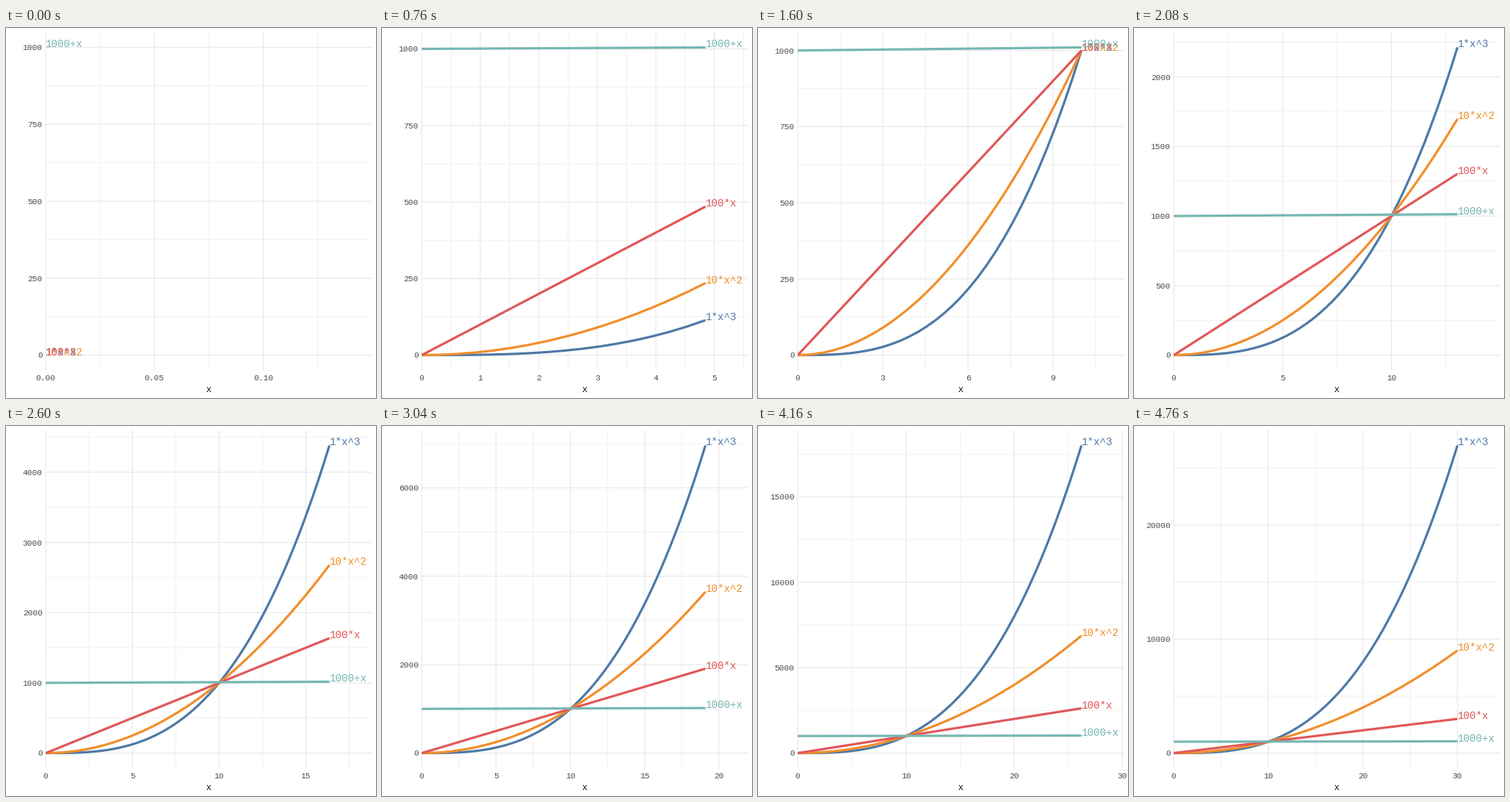
Animation of 504 by 504 pixels, one loop 4800 ms. Source, as a matplotlib script:

```python
import math

import matplotlib.pyplot as plt
import numpy as np
from matplotlib.animation import FuncAnimation
from matplotlib.collections import LineCollection
from matplotlib.patches import Rectangle

SIZE = 504
FRAMES, INTERVAL = 120, 40
LEFT, RIGHT, TOP, BOTTOM = 54.2, 498.5, 5.5, 466.5
FONT = "Liberation Mono"
TICK_SIZE, LABEL_SIZE = 11.2, 14.2

CURVES = [
    ("1*x^3", "#4E79A7", lambda x: x ** 3),
    ("10*x^2", "#F28E2B", lambda x: 10 * x ** 2),
    ("100*x", "#E15759", lambda x: 100 * x),
    ("1000+x", "#76B7B2", lambda x: 1000 + x),
]

# Samples appear on whole frames; the tip moves linearly between them.
XS = np.linspace(0, 30, 100)
KEYS = np.floor(np.arange(100) * (FRAMES - 1) / 99 + 0.5)


def nice_breaks(lo, hi, m=5):
    """Tick positions by the extended Wilkinson algorithm."""
    steps = [1, 5, 2, 2.5, 4, 3]
    eps = 1e-10
    span = hi - lo

    def total(simple, cover, dense):
        return 0.25 * simple + 0.2 * cover + 0.5 * dense + 0.05

    def search():
        best, found = -2, None
        for j in range(1, 50):
            for i, q in enumerate(steps):
                base = 1 - i / (len(steps) - 1) - j
                if total(base + 1, 1, 1) < best:
                    return found
                for k in range(2, 50):
                    dense_max = 2 - (k - 1) / (m - 1) if k >= m else 1
                    if total(base + 1, 1, dense_max) < best:
                        break
                    z = math.ceil(math.log10(span / (k + 1) / j / q))
                    while True:
                        step = j * q * 10.0 ** z
                        z += 1
                        over = max(step * (k - 1) - span, 0) / 2
                        cover_max = 1 - (over / (0.1 * span)) ** 2
                        if total(base + 1, cover_max, dense_max) < best:
                            break
                        first = math.floor(hi / step) * j - (k - 1) * j
                        last = math.ceil(lo / step) * j
                        for start in range(first, last + 1):
                            a = start * step / j
                            b = a + step * (k - 1)
                            rest = a % step
                            on_grid = min(rest, step - rest) < eps
                            zero = on_grid and a <= 0 <= b
                            cover = 1 - 0.5 * ((hi - b) ** 2 + (lo - a) ** 2) / (0.1 * span) ** 2
                            ratio = (k - 1) / (b - a) * (max(b, hi) - min(a, lo)) / (m - 1)
                            score = total(base + zero, cover, 2 - max(ratio, 1 / ratio))
                            if score > best:
                                best, found = score, (a, step, k)
        return found

    a, step, k = search()
    ticks = a + step * np.arange(k)
    mids = a + step * (np.arange(-1, k) + 0.5)

    def inside(v):
        return v[(v >= lo) & (v <= hi)]

    return inside(ticks), inside(mids)


def tick_text(ticks):
    """Format all ticks with the fewest decimals that suit every one."""
    digits = next(d for d in range(6)
                  if all(abs(round(t, d) - t) < 1e-9 for t in ticks))
    return [f"{abs(t):.{digits}f}" for t in ticks]


fig = plt.figure(figsize=(SIZE / 72, SIZE / 72), dpi=72, facecolor="white")
ax = fig.add_axes([0, 0, 1, 1])


def write(x, y, text, color, size, ha):
    ax.text(x, y, text, color=color, fontsize=size, family=FONT,
            ha=ha, va="baseline", zorder=5)


def grid(px, py, width):
    lines = [[(x, TOP), (x, BOTTOM)] for x in px]
    lines += [[(LEFT, y), (RIGHT, y)] for y in py]
    art = LineCollection(lines, colors="#EBEBEB", linewidths=width, zorder=1)
    art.set_snap(False)
    ax.add_collection(art)


def draw(frame):
    ax.clear()
    ax.set(xlim=(0, SIZE), ylim=(SIZE, 0))
    ax.axis("off")
    panel = Rectangle((LEFT, TOP), RIGHT - LEFT, BOTTOM - TOP,
                      transform=ax.transData)

    now = np.interp(frame, KEYS, XS)
    shown = np.append(XS[KEYS < frame], now)
    paths = [np.interp(shown, XS, f(XS)) for _, _, f in CURVES]
    peak = max(p[-1] for p in paths)
    x_max = 1.15 * now if frame else 0.15
    y_min, y_max = -0.05 * peak, 1.05 * peak

    def to_x(x):
        return LEFT + (RIGHT - LEFT) * x / x_max

    def to_y(y):
        return BOTTOM - (BOTTOM - TOP) * (y - y_min) / (y_max - y_min)

    x_ticks, x_mids = nice_breaks(0, x_max)
    y_ticks, y_mids = nice_breaks(y_min, y_max)
    grid(to_x(x_mids), to_y(y_mids), 0.68)
    grid(to_x(x_ticks), to_y(y_ticks), 1.36)
    for t, s in zip(x_ticks, tick_text(x_ticks)):
        write(to_x(t), 480, s, "#4D4D4D", TICK_SIZE, "center")
    for t, s in zip(y_ticks, tick_text(y_ticks)):
        write(49.7, to_y(t) + 3.9, s, "#4D4D4D", TICK_SIZE, "right")
    write((LEFT + RIGHT) / 2, 496, "X", "black", TICK_SIZE, "center")

    for (name, color, _), ys in zip(CURVES, paths):
        if frame:
            line, = ax.plot(to_x(shown), to_y(ys), color=color, lw=3.2,
                            solid_capstyle="butt", solid_joinstyle="round",
                            zorder=3)
            line.set_clip_path(panel)
        write(to_x(now), to_y(ys[-1]), name, color, LABEL_SIZE, "left")


anim = FuncAnimation(fig, draw, frames=FRAMES, interval=INTERVAL,
                     init_func=lambda: None, repeat=True, repeat_delay=0)
plt.show()
```
